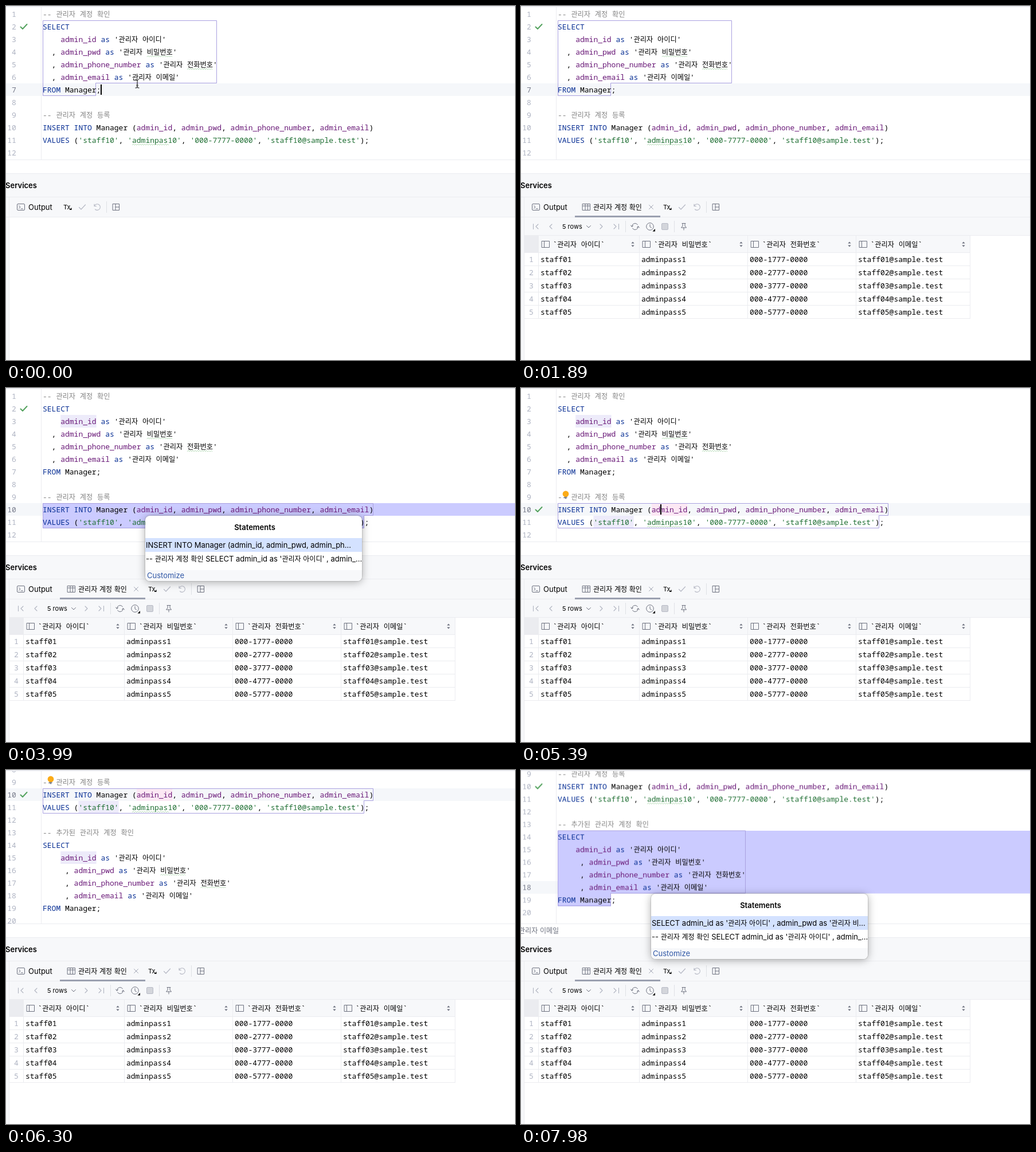
An HTML page that plays this animation: 888x618 px, repeating every 8 s.

```html
<!DOCTYPE html>
<html lang="ko">
<head>
<meta charset="utf-8">
<title>SQL console</title>
<style>
  html, body { margin: 0; width: 100%; height: 100%; overflow: hidden; background: #fff; }
  svg { display: block; width: 888px; height: 618px; }
  text { white-space: pre; fill: #000; }
  .mono { font: 500 13px "Noto Sans Mono", monospace; }
  .ui { font: 13px Inter, sans-serif; }
  .bold { font-weight: 600; }
  .small { font-size: 11px; }
  .ko { font: 12.2px "Noto Sans CJK KR", "Noto Sans CJK", sans-serif; }
  .ui .ko { font-size: 12.05px; }
  .shadow { filter: drop-shadow(0 2px 8px rgba(0, 0, 0, .24)) drop-shadow(0 0 1px rgba(0, 0, 0, .35)); }
</style>
</head>
<body>
<svg id="stage" viewBox="0 0 888 618">
  <defs><clipPath id="editorClip"><rect y="2" width="888" height="266"/></clipPath></defs>
</svg>
<script>
const CHAR = 7.8, KO = 11.22, ROW = 22, LEFT = 64;
const INK = '#6c707e', LINE = '#ebecf0', PANEL = '#f7f8fa', DIM = '#aeb3c2';
const stage = document.getElementById('stage');
const rowTop = n => 3 + ROW * (n - 1);

function add(parent, tag, attrs = {}, content) {
  const el = document.createElementNS('http://www.w3.org/2000/svg', tag);
  for (const key in attrs) el.setAttribute(key, attrs[key]);
  if (content !== undefined) el.textContent = content;
  return parent.appendChild(el);
}
const group = (parent, x = 0, y = 0) => add(parent, 'g', { transform: `translate(${x} ${y})` });
const rect = (parent, x, y, width, height, fill, more) => add(parent, 'rect', { x, y, width, height, fill, ...more });
const line = (parent, d, stroke, more) => add(parent, 'path', { d, stroke, fill: 'none', ...more });
const icon = (parent, x, y, d, stroke = INK, more) =>
  line(parent, d, stroke, { transform: `translate(${x} ${y})`, 'stroke-linecap': 'round', 'stroke-linejoin': 'round', ...more });

// Animation: every track is a stepped keyframe list over one loop.
let css = '', tracks = 0;
function track(el, prop, stops) {
  const name = 'track' + tracks++;
  css += `@keyframes ${name}{${stops.map(([ms, v]) => `${ms / 80}%{${prop}:${v}}`).join('')}}\n`;
  el.style.animation = `${name} 8s step-end infinite`;
  return el;
}
const show = (el, ...spans) =>
  track(el, 'opacity', [[0, 0], ...spans.flatMap(([from, to]) => [[from, 1], [to, 0]])]);

// Text
const runs = str => str.match(/[가-힣]+|[^가-힣]+/g) || [];
const isKo = str => /[가-힣]/.test(str);
const width = str => [...str].reduce((sum, c) => sum + (isKo(c) ? KO : CHAR), 0);

function mono(parent, x, y, str, fill = '#000') {
  for (const run of runs(str)) {
    add(parent, 'text', { x, y, class: isKo(run) ? 'ko' : 'mono', style: `fill:${fill}` }, run);
    x += width(run);
  }
}
function ui(parent, x, y, str, cls = '', fill = '#000', anchor = 'start') {
  const el = add(parent, 'text', { x, y, class: 'ui ' + cls, style: `fill:${fill}`, 'text-anchor': anchor });
  for (const run of runs(str)) add(el, 'tspan', isKo(run) ? { class: 'ko' } : {}, run);
}

// Editor
const code = `-- 관리자 계정 확인
SELECT
    admin_id as '관리자 아이디'
  , admin_pwd as '관리자 비밀번호'
  , admin_phone_number as '관리자 전화번호'
  , admin_email as '관리자 이메일'
FROM Manager;

-- 관리자 계정 등록
INSERT INTO Manager (admin_id, admin_pwd, admin_phone_number, admin_email)
VALUES ('staff10', 'adminpas10', '000-7777-0000', 'staff10@sample.test');

-- 추가된 관리자 계정 확인
SELECT
    admin_id as '관리자 아이디'
     , admin_pwd as '관리자 비밀번호'
     , admin_phone_number as '관리자 전화번호'
     , admin_email as '관리자 이메일'
FROM Manager;
`.split('\n');

function tokenColor(token, source) {
  if (token.startsWith('--')) return '#858585';
  if (/^(SELECT|FROM|INSERT|INTO|VALUES|as)$/.test(token)) return '#082f94';
  if (token.startsWith('admin_')) return '#6a1a78';
  if (token[0] === "'" && source.startsWith('VALUES')) return '#1f6f33';
  return '#000';
}
function codeLine(parent, source, n) {
  let x = LEFT;
  for (const token of source.match(/--.*|'[^']*'|\w+|\s+|[^\w\s']+/g) || []) {
    if (token.trim()) mono(parent, x, rowTop(n) + 16, token, tokenColor(token, source));
    x += width(token);
  }
}
function squiggle(parent, source, n) {
  const word = source.match(/비밀번호|전화번호|adminpas(?=10)/);
  if (!word) return;
  const x = LEFT + width(source.slice(0, word.index));
  const waves = Math.round(width(word[0]) / 4);
  line(parent, `M${x} ${rowTop(n) + 20}` + 'l2 -2l2 2'.repeat(waves), '#b0d8b2', { 'stroke-width': .9 });
}
// Outline of rows first..last, where the last row ends at its own x.
const block = (first, last, right, end, inset = 0) =>
  `M${LEFT + inset} ${rowTop(first) + inset}H${right}V${rowTop(last) - inset}H${end}V${rowTop(last + 1) - inset}H${LEFT + inset}Z`;

const editorBox = add(stage, 'g', { 'clip-path': 'url(#editorClip)' });
const editor = add(editorBox, 'g');
const scrollEnd = 183.5;
const scrollStops = [[0, 0], [5810, 30], [5880, 68], [5950, 102]];
for (let i = 1; i <= 9; i++) scrollStops.push([5950 + 70 * i, Math.round(scrollEnd - 81 * Math.exp(-.35 * i))]);
scrollStops.push([6650, scrollEnd]);
track(editor, 'transform', scrollStops.map(([ms, y]) => [ms, `translate(0px,${-y}px)`]));

const lineNumber = (parent, n, fill) =>
  add(parent, 'text', { x: 17.8, y: rowTop(n) + 16, class: 'mono', 'text-anchor': 'end', style: `fill:${fill}` }, n);
code.forEach((_, i) => lineNumber(editor, i + 1, DIM));
[[7, 0, 2870], [10, 2870, 7350], [18, 7350, 8000]].forEach(([n, from, to]) => {
  const current = show(add(editor, 'g'), [from, to]);
  rect(current, 0, rowTop(n), 888, ROW, '#f5f7fa');
  lineNumber(current, n, '#767a8a');
});
rect(editor, 61, 0, 1, 480, LINE);

const usages = show(add(editor, 'g'), [3080, 7490]);
const usage = (n, col, length, fill) => rect(usages, LEFT + col * CHAR, rowTop(n), length * CHAR, ROW, fill);
usage(3, 4, 8, '#edebfa');
usage(15, 4, 8, '#edebfa');
usage(11, 8, 9, '#edebfa');
usage(10, 21, 8, '#fce8f4');

code.forEach((source, i) => squiggle(editor, source, i + 1));

const statements = [
  { shape: [2, 7, 367.5, 156.5], framed: [0, 3430], chosen: [770, 1260] },
  { shape: [10, 11, 640.5, 624.5], framed: [3430, 7840], chosen: [3780, 4410] },
  { shape: [14, 19, 391.5, 156.5], framed: [7840, 8000], chosen: [7840, 8000] },
];
for (const { shape: [first, last, , end], chosen } of statements)
  show(add(editor, 'path', { d: block(first, last, 888, end + .5), fill: '#cbcbff' }), chosen);
for (const { shape, framed } of statements)
  show(line(editor, block(...shape, .5), '#a9a0e0'), framed);

code.forEach((source, i) => codeLine(editor, source, i + 1));

[[2, 0, 4480], [10, 4480, 8000]].forEach(([n, from, to]) =>
  show(icon(editor, 31, rowTop(n) + 11, 'M-5.5 .5L-2 4L5.5 -4', '#55a35f', { 'stroke-width': 2 }), [from, to]));

function bulb(n, from, to) {
  const el = show(group(editor, 78, rowTop(n)), [from, to]);
  add(el, 'circle', { cy: 6, r: 5.4, fill: '#fbab17' });
  rect(el, -2.5, 11, 5, 1.5, INK);
  rect(el, -1.5, 13, 3, 1.3, INK);
}
bulb(6, 2170, 2310);
bulb(9, 5390, 6370);

const caret = (n, x, ...spans) => show(rect(editor, x, rowTop(n) + 2, 2, 18, '#000'), ...spans);
caret(7, 165, [0, 770], [1260, 1820]);
caret(10, 243, [3080, 3780], [4410, 5530]);
caret(18, 227, [7490, 7840]);

rect(stage, 0, 0, 888, 2, LINE);
rect(stage, 0, 268, 888, 1, LINE);
const breadcrumb = show(add(stage, 'g'), [7630, 8000]);
ui(breadcrumb, -4, 284.5, '관리자 이메일', '', INK);

// Services panel
rect(stage, 0, 292, 888, 77, PANEL);
rect(stage, 0, 369, 5, 249, PANEL);
[292, 333, 368].forEach(y => rect(stage, 0, y, 888, 1, LINE));
rect(stage, 5, 334, 1, 284, LINE);
ui(stage, -1, 318, 'Services', 'bold');
rect(stage, 19.5, 345.5, 13, 11, 'none', { rx: 1.5, stroke: INK });
icon(stage, 26, 351, 'M-3.5 -2.5L-1 0L-3.5 2.5M0 3H3.5');
ui(stage, 39, 356, 'Output');

const tools = track(add(stage, 'g'), 'transform', [[0, 'translate(0px,0px)'], [1400, 'translate(148px,0px)']]);
ui(tools, 100, 355, 'Tx', 'small');
add(tools, 'path', { d: 'M114.5 352v4h-4z' });
icon(tools, 133, 351, 'M-5.5 .5L-2 4L5.5 -4', '#b5b8c4', { 'stroke-width': 1.2 });
icon(tools, 159, 351, 'M-5 -5V-1.5H-1.5M-5 -1.5A5.3 5.3 0 1 1 -3.5 4', '#b5b8c4', { 'stroke-width': 1.1 });
rect(tools, 175, 341, 1, 20, '#dfe1e5');
icon(tools, 192, 351, 'M-5.5 -5.5H5.5V5.5H-5.5ZM-1 -5.5V5.5M-1 0H5.5');

// Result grid
const result = show(add(stage, 'g'), [1400, 8000]);
rect(result, 94, 366, 149, 3, '#9ba0b0');
icon(result, 114, 351, 'M-6.5 -5.5H6.5V5.5H-6.5ZM-6.5 -2H6.5M-2 -5.5V5.5M2.5 -5.5V5.5');
ui(result, 126, 356, '관리자 계정 확인');
icon(result, 227, 351, 'M-3.5 -3.5L3.5 3.5M3.5 -3.5L-3.5 3.5', '#a0a4b2');

rect(result, 6, 369, 882, 32, PANEL);
rect(result, 6, 400, 882, 1, LINE);
const pager = (x, d) => icon(result, x, 385, d, '#b0b4c0', { 'stroke-width': 1.1 });
pager(26, 'M-4.5 -4.5V4.5M4 -4L0 0L4 4');
pager(52, 'M2 -4L-2 0L2 4');
pager(140, 'M-2 -4L2 0L-2 4');
pager(166, 'M4.5 -4.5V4.5M-4 -4L0 0L-4 4');
ui(result, 72, 389, '5 rows', 'small');
icon(result, 118, 385, 'M-3.5 -1.5L0 2L3.5 -1.5');
[182, 267].forEach(x => rect(result, x, 375, 1, 20, '#dfe1e5'));
icon(result, 199, 385, 'M-5.5 0A5.5 5.5 0 0 1 4.5 -3.2M5.5 0A5.5 5.5 0 0 1 -4.5 3.2M-7.5 -2L-5.5 .5L-3.3 -1.6M7.5 2L5.5 -.5L3.3 1.6');
add(result, 'circle', { cx: 225, cy: 385, r: 6.3, fill: 'none', stroke: INK });
icon(result, 225, 385, 'M0 -3.5V.5L2.5 2');
add(result, 'path', { d: 'M234 389v4.5h-4.5z', fill: '#000' });
rect(result, 245.5, 379.5, 11, 11, '#d3d5db', { rx: 1.5, stroke: '#b8bbc6' });
icon(result, 284, 385, 'M-3 -5.5H3M-2 -5.5V-1L-4.5 2H4.5L2 -1V-5.5M0 2V6');

const edges = [30, 206, 395, 584, 783];
const titles = ['관리자 아이디', '관리자 비밀번호', '관리자 전화번호', '관리자 이메일'];
rect(result, 6, 401, 778, 30, PANEL);
rect(result, 6, 401, 24, 30, LINE);
edges.forEach(x => rect(result, x, 401, 1, 145, LINE));
titles.forEach((title, i) => {
  const x = edges[i];
  icon(result, x + 13, 416, 'M-6.5 -5.5H6.5V5.5H-6.5ZM-2.5 -5.5V5.5');
  mono(result, x + 25.5, 420.5, '`' + title + '`');
  add(result, 'path', { d: 'M-2.7 -1.5L0 -4.5L2.7 -1.5ZM-2.7 1.5L0 4.5L2.7 1.5Z', fill: INK, transform: `translate(${edges[i + 1] - 11} 416)` });
});
for (let n = 0; n <= 5; n++) rect(result, 6, 430 + 23 * n, 778, 1, LINE);
for (let n = 1; n <= 5; n++) {
  const y = 424 + 23 * n;
  mono(result, 14, y, String(n), DIM);
  [`staff0${n}`, `adminpass${n}`, `000-${n}777-0000`, `staff0${n}@sample.test`]
    .forEach((cell, i) => mono(result, edges[i] + 4, y, cell));
}

// Statement chooser
function popup(x, y, first, stops) {
  const el = track(group(stage), 'opacity', [[0, 0], ...stops]);
  const box = group(el, x, y);
  rect(box, 0, 0, 378, 114, '#fff', { rx: 8, class: 'shadow' });
  add(box, 'path', { d: 'M0 95H378V106a8 8 0 0 1 -8 8H8a8 8 0 0 1 -8 -8Z', fill: PANEL });
  rect(box, 0, 39, 378, 24, '#d4e2ff');
  ui(box, 191, 25, 'Statements', 'bold', '#000', 'middle');
  ui(box, 1, 56, first);
  ui(box, 1, 80, "-- 관리자 계정 확인 SELECT admin_id as '관리자 아이디' , admin_...");
  ui(box, 3, 109, 'Customize', '', '#2f57a6');
}
const selectItem = "SELECT admin_id as '관리자 아이디' , admin_pwd as '관리자 비...";
popup(165, 157, selectItem, [[770, .6], [840, 1], [1260, .5], [1330, 0]]);
popup(243, 223, 'INSERT INTO Manager (admin_id, admin_pwd, admin_ph...', [[3780, .6], [3850, 1], [4410, .5], [4480, 0]]);
popup(227, 216, selectItem, [[7840, .6], [7910, 1]]);

// Mouse: eased moves sampled every 70 ms
const pointer = show(add(stage, 'g'), [0, 770], [2310, 3780], [6790, 7840]);
const beam = add(pointer, 'g');
line(beam, 'M-3.5 -7.5Q0 -7.5 0 -5V5Q0 7.5 -3.5 7.5M3.5 -7.5Q0 -7.5 0 -5V5Q0 7.5 3.5 7.5M-2 3H2', '#222', { 'stroke-width': 1.2 });
function move(start, steps, [x0, y0], [x1, y1]) {
  return Array.from({ length: steps + 1 }, (_, i) => {
    const k = 1 - (1 - i / steps) ** 2;
    return [start + 70 * i, `translate(${x0 + (x1 - x0) * k}px,${y0 + (y1 - y0) * k}px)`];
  });
}
track(beam, 'transform', [
  ...move(0, 4, [229, 135.5], [236, 230]),
  ...move(2310, 11, [628, 236], [244, 214]),
  ...move(6790, 10, [625, 249], [228, 207]),
]);

document.head.appendChild(document.createElement('style')).textContent = css;
</script>
</body>
</html>
```
